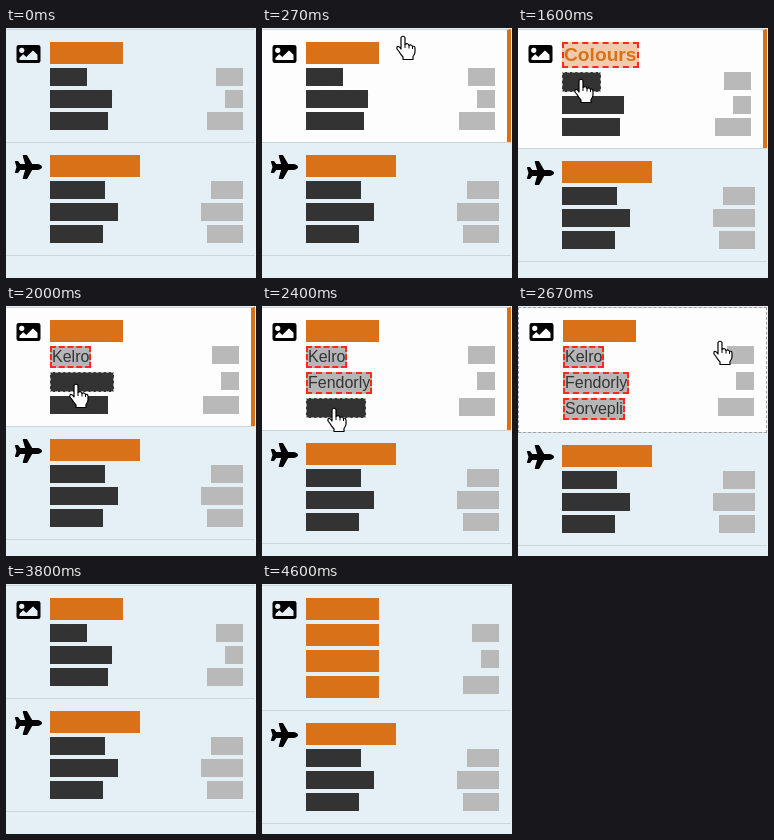
Recreate the animation shown at these times as an HTML page. Size 250x250 px, loop 5740 ms.

```html
<!DOCTYPE html>
<html lang="en">
<head>
<meta charset="utf-8">
<title>Picking list entries</title>
<style>
  html, body { margin: 0; width: 100%; height: 100%; overflow: hidden; background: #e4eff6; }
  body { position: relative; font: 16px/18px "Liberation Sans", Arial, sans-serif; }
  .list { position: absolute; top: 1px; left: 0; width: 249px; }
  .item { position: relative; box-sizing: border-box; padding: 12px 12px 12px 44px; border-top: 1px solid #cbd6de; }
  .icon { position: absolute; left: 8.5px; top: 12px; width: 27px; height: 24px; }
  .row { display: flex; justify-content: space-between; align-items: flex-start; margin-top: 4px; }
  .icon + .row { margin-top: 0; }
  .label { --ink: 51, 51, 51; display: block; height: 18px; white-space: pre;
           color: rgb(var(--ink)); background: rgb(var(--ink)); }
  .label.head { --ink: 216, 113, 24; height: 22px; font: bold 19.2px/22px "Liberation Sans", Arial, sans-serif; }
  .label.over { border: 1px dashed #aaa; }
  .label.open { border: 2px dashed #ff2a1c; background: rgba(var(--ink), .35); }
  .value { height: 18px; background: #b9b9ba; }

  .hot { background: #fdfdfd; border-right: 4px solid #d87118; }
  .pick { background: #fdfdfd; padding-left: 45px; padding-right: 13px; z-index: 1; }
  .pick .icon { left: 9.5px; }
  .pick::after { content: ""; position: absolute; inset: -1px 0; border: 1px dashed #a2a2a2; }
  .edge { position: absolute; top: 0; left: 0; width: 249px; height: 2px; background: #fdfdfd;
          border-bottom: 1px dashed #a2a2a2; display: none; }
  .above .edge { display: block; }
  .above .list { top: 3px; }
  .above .item:first-child { border-top-color: transparent; }
  #hand { position: absolute; left: 0; top: 0; width: 24px; height: 28px; z-index: 2; }
</style>
</head>
<body>
<div class="list" id="list"></div>
<div class="edge"></div>
<svg id="hand" viewBox="-8 -2 24 28">
  <path fill="#fff" stroke="#000" stroke-width="1.2" stroke-linejoin="round"
    d="M-2 1.5Q0-1 2 1.5V8.5Q5 6.5 6 9.5Q8.5 8 9.5 10.5Q12 9.5 12 12.5V16Q12 18 10 20.5V23.5H0V21Q-2 19-4 15.5L-6 13Q-6.5 10-4.5 10.5Q-3 11-2 13Z"/>
  <path fill="none" stroke="#000" d="M2 8.5V12M6 9.5V12.5M9.5 10.5V13"/>
</svg>
<script>
const LOOP = 5740;
const TITLE = 'Colours';

const icons = {
  picture: ['32 0 576 512', 'M48 64H464Q512 64 512 112V400Q512 448 464 448H48Q0 448 0 400V112Q0 64 48 64Z' +
    'M112 120a56 56 0 1 0 0 112a56 56 0 1 0 0-112ZM64 384H448V272L360 184Q352 178 344 184L208 320L152 264Q144 258 136 264L64 336Z'],
  plane: ['0 0 576 512', 'M480 192H366L261 8Q256 0 247 0H181Q162 0 166 20L215 192H112L69 134Q64 128 56 128H16Q-3 130 0 148' +
    'L32 256L0 364Q-3 382 16 384H56Q64 384 69 378L112 320H215L166 492Q162 512 181 512H247Q256 512 261 504' +
    'L366 320H480C515 320 576 291 576 256S515 192 480 192Z']
};
icons.picture[0] = '-32 0 576 512';

// A label is a text, or the width of a bar that stays closed.
const groups = [
  { icon: 'picture', rows: [[TITLE, 0], ['Kelro', 27], ['Fendorly', 18], ['Sorvepli', 36]] },
  { icon: 'plane', rows: [[90, 0], [55, 32], [68, 42], [53, 36]] },
  { rows: [] }
];

// Start time, state of each row (- closed, o hovered, r revealed, t titled), mode of the first group.
const scenes = [
  [0, '----', ''],
  [70, '----', 'hot'],
  [330, 'o---', 'hot'],
  [800, 'r---', 'hot'],
  [1400, 'ro--', 'hot'],
  [1800, '-r--', 'hot'],
  [1930, '-ro-', 'hot'],
  [2200, '-rr-', 'hot'],
  [2330, '-rro', 'hot'],
  [2600, '-rrr', 'pick'],
  [2930, '-rrr', 'above'],
  [3670, '----', ''],
  [4400, '-ttt', '']
];

// Time and fingertip position.
const path = [
  [70, 165, 2], [600, 90, 22], [1200, 90, 22], [1580, 63, 51], [1800, 63, 51],
  [2000, 70, 78], [2200, 70, 78], [2400, 72, 102], [2560, 72, 102],
  [2665, 202, 35], [2800, 202, 35], [3060, 212, -28]
];

const list = document.getElementById('list');
const hand = document.getElementById('hand');

function add(parent, cls) {
  const el = document.createElement('div');
  el.className = cls;
  parent.append(el);
  return el;
}

function buildGroup({ icon, rows }) {
  const item = add(list, 'item');
  if (icon) {
    const [box, d] = icons[icon];
    item.innerHTML = `<svg class="icon" viewBox="${box}"><path fill-rule="evenodd" d="${d}"/></svg>`;
  }
  const labels = rows.map(([label, value], i) => {
    const row = add(item, 'row');
    const el = add(row, i ? 'label' : 'label head');
    if (typeof label === 'number') el.style.width = label + 'px';
    else el.textContent = label;
    if (value) add(row, 'value').style.width = value + 'px';
    return el;
  });
  return { item, labels };
}

const first = groups.map(buildGroup)[0];
const stateClass = { o: ' over', r: ' open' };
let shown = null;

function show(scene) {
  if (scene === shown) return;
  shown = scene;
  const [, states, mode] = scene;
  document.body.className = mode === 'above' ? mode : '';
  first.item.className = 'item ' + (mode === 'above' ? '' : mode);
  first.labels.forEach((el, i) => {
    const titled = i === 0 || states[i] === 't';
    el.className = 'label' + (titled ? ' head' : '') + (stateClass[states[i]] || '');
    el.textContent = titled ? TITLE : groups[0].rows[i][0];
  });
}

function moveHand(t) {
  const next = path.findIndex(p => p[0] > t);
  hand.style.display = next > 0 ? '' : 'none';
  if (next < 1) return;
  const [t0, x0, y0] = path[next - 1];
  const [t1, x1, y1] = path[next];
  const u = (t - t0) / (t1 - t0);
  const k = u * u * (3 - 2 * u);
  const x = Math.round(x0 + (x1 - x0) * k) - 8;
  const y = Math.round(y0 + (y1 - y0) * k) - 2;
  hand.style.transform = `translate(${x}px, ${y}px)`;
}

const start = performance.now();

function frame() {
  const t = (performance.now() - start) % LOOP;
  show(scenes.filter(s => s[0] <= t).pop());
  moveHand(t);
  requestAnimationFrame(frame);
}
frame();
</script>
</body>
</html>
```
